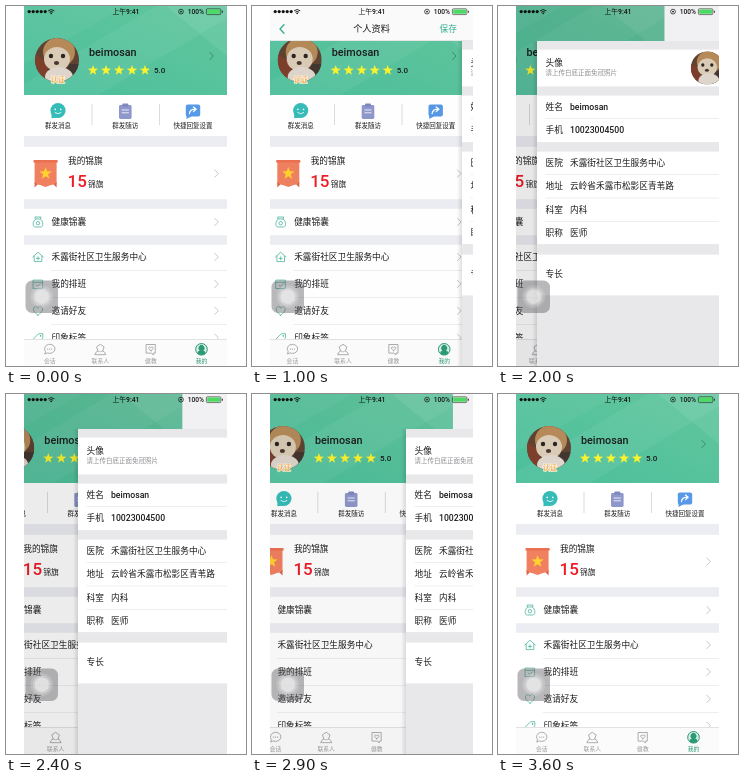
These frames come from a looping animation (240x360 px, 3700 ms). An HTML page:

```html
<!DOCTYPE html>
<html lang="zh-CN">
<head>
<meta charset="utf-8">
<title>个人资料</title>
<style>
html, body { margin: 0; width: 100%; height: 100%; overflow: hidden; background: #fff; }
svg { display: block; width: 240px; height: 360px; }
text { font-family: Roboto, "Noto Sans CJK SC", "Noto Sans CJK", sans-serif; font-weight: 500; }
</style>
</head>
<body>
<svg id="stage" viewBox="0 0 240 360"></svg>
<script>
const LEFT = 18, WIDTH = 203, LOOP = 3700, STEP = 100;
const GAP = '#ececf3', PAGE = '#e8e7ea', LINE = '#dcdce0', INK = '#1c1c1e';
const TEAL = '#2fae8e', MUTED = '#9a9a9e', PALE = '#4fb5a0', GREEN = '#2c9a76';
const USER = 'beimosan', PHONE = '10023004500';
const CLINIC = '禾露街社区卫生服务中心', ADDRESS = '云岭省禾露市松影区青苇路';

const rect = (x, y, w, h, fill, extra = '') =>
  `<rect x="${x}" y="${y}" width="${w}" height="${h}" fill="${fill}" ${extra}/>`;
const circle = (x, y, r, fill, extra = '') =>
  `<circle cx="${x}" cy="${y}" r="${r}" fill="${fill}" ${extra}/>`;
const ellipse = (x, y, rx, ry, fill) =>
  `<ellipse cx="${x}" cy="${y}" rx="${rx}" ry="${ry}" fill="${fill}"/>`;
const path = (d, fill, extra = '') => `<path d="${d}" fill="${fill}" ${extra}/>`;
const stroke = (d, color, width = 0.8) =>
  path(d, 'none', `stroke="${color}" stroke-width="${width}" stroke-linecap="round" stroke-linejoin="round"`);
const text = (x, y, size, str, fill = INK, anchor = 'start', extra = '') =>
  `<text x="${x}" y="${y}" font-size="${size}" fill="${fill}" text-anchor="${anchor}" ${extra}>${str}</text>`;
const group = (x, y, body, scale = 1) =>
  `<g transform="translate(${x} ${y}) scale(${scale})">${body}</g>`;
const chevron = (x, y, color = '#c0c0c5') => stroke(`M${x - 1.7} ${y - 3.6}l3.6 3.6l-3.6 3.6`, color, 0.9);
const band = (top, bottom) =>
  rect(LEFT, top, WIDTH, bottom - top, '#fff') +
  rect(LEFT, top, WIDTH, 0.4, LINE) + rect(LEFT, bottom - 0.4, WIDTH, 0.4, LINE);
const divider = (x, y) => rect(x, y, LEFT + WIDTH - x, 0.5, LINE);
const dots = (y, gap, r, fill) => [-gap, 0, gap].map(x => circle(x, y, r, fill)).join('');

function star(x, y, r, fill) {
  const pts = Array.from({ length: 10 }, (_, i) => {
    const a = -Math.PI / 2 + i * Math.PI / 5, d = i % 2 ? r * 0.4 : r;
    return `${(x + d * Math.cos(a)).toFixed(2)},${(y + d * Math.sin(a)).toFixed(2)}`;
  });
  return `<polygon points="${pts.join(' ')}" fill="${fill}"/>`;
}

// A soft picture of a small furry dog, radius 22 around the origin.
const avatar = (x, y, r) => group(x, y, `<g clip-path="url(#disc)">` +
  rect(-22, -22, 44, 44, '#5f4232') +
  path('M-22 -6L-10 2L-8 22H-22Z', '#7d3f2c') +
  path('M12 4H22V22H6Z', '#433630') +
  ellipse(2, -8, 16, 15, '#b58a58') +
  ellipse(0, -1, 13, 12, '#d9cbb6') +
  ellipse(2, 17, 14, 10, '#ded6cc') +
  circle(-6, -4, 2.2, '#2c241f') + circle(6, -4, 2.2, '#2c241f') +
  ellipse(-0.5, 3, 2.6, 2, '#463730') + '</g>', r / 22);

const icons = {
  chat: circle(0, -0.5, 7.6, '#36bcb8') + path('M-6.5 2L-6.5 7.2L0 6.5Z', '#36bcb8') +
    circle(-2.8, -1.6, 0.8, '#fff') + circle(2.8, -1.6, 0.8, '#fff') + stroke('M-3 1.6Q0 4.2 3 1.6', '#fff'),
  board: rect(-6.3, -6, 12.6, 14, '#8f98cb', 'rx="1.4"') + rect(-3, -7.6, 6, 3.4, '#8088c0', 'rx="1"') +
    stroke('M-3.2 -1H3.2M-3.2 1.8H3.2', '#fff'),
  reply: rect(-7.2, -6.5, 14.4, 12, '#5799e6', 'rx="2"') + path('M-6.5 4V8L-1 5Z', '#5799e6') +
    stroke('M-3.6 2.6Q-3 -1.6 2 -1.8M0.4 -4L3.2 -1.8L0.4 0.6', '#fff', 1.2),
  pouch: stroke('M-2.6 -2.8C-5.6 -0.6 -5.6 5 -2.8 5H2.8C5.6 5 5.6 -0.6 2.6 -2.8ZM-2.6 -2.8L-3 -5H3L2.6 -2.8', PALE) +
    circle(0, 1.2, 1.7, 'none', `stroke="${PALE}" stroke-width=".8"`),
  clinic: stroke('M-5.2 0L0 -4.8L5.2 0M-3.8 -1V4.6H3.8V-1M-1.6 1.4H1.6M0 -0.2V3', PALE),
  plan: stroke('M-4.6 -3.8H4.6V4.6H-4.6ZM-4.6 -1.6H4.6M-1.8 1.2L-0.3 2.6L2.2 0', PALE),
  heart: stroke('M0 4.4C-7 -0.2 -4.6 -4.6 -1.8 -4.2Q-0.4 -4 0 -2.6Q0.4 -4 1.8 -4.2C4.6 -4.6 7 -0.2 0 4.4Z', PALE),
  tag: stroke('M-5 1.6L0.6 -4H4.8V0.2L-0.8 5.8Z', PALE) + circle(2.6, -1.8, 0.8, PALE),
  talk: stroke('M-4.8 4.2L-4.2 2A5.2 4.6 0 1 1 -2 3.6Z', MUTED) + dots(-0.4, 2, 0.6, MUTED),
  people: stroke('M-5.4 4.8Q-5 2.4 -2.4 1.6L-3.8 -2.6L0 -5.2L3.8 -2.6L2.4 1.6Q5 2.4 5.4 4.8Z', MUTED) +
    stroke('M-2.4 1.6Q0 3.4 2.4 1.6', MUTED, 0.6),
  card: stroke('M-4.4 -5H4.4V3.6H2.4V5.4L0.4 3.6H-4.4Z', MUTED) +
    stroke('M0 1.2C-4 -1.2 -2 -3.6 0 -1.8C2 -3.6 4 -1.2 0 1.2Z', MUTED),
  me: circle(0, -0.2, 5.8, '#d7efe5', `stroke="${GREEN}" stroke-width="1"`) +
    path('M-4.2 4.2Q-4 1.6 -1.8 1A2.9 3.1 0 1 1 1.8 1Q4 1.6 4.2 4.2Q0 6.8 -4.2 4.2Z', GREEN),
};

function home() {
  const header = rect(LEFT, 0, WIDTH, 89, 'url(#green)') +
    path('M18 58L120 0H18Z', '#fff', 'opacity=".04"') +
    path('M92 89L221 12V0H150L18 78V89Z', '#fff', 'opacity=".05"') +
    path('M160 0H221V50Z', '#fff', 'opacity=".07"') +
    avatar(51, 54, 22) +
    text(51.8, 76.4, 7, '认证', '#f09a2e', 'middle', 'stroke="#fff3dc" stroke-width="1.4" paint-order="stroke"') +
    text(83, 50, 10.8, USER) +
    [0, 1, 2, 3, 4].map(i => star(87 + i * 13, 64.3, 5.4, '#fdf32c')).join('') +
    text(148, 67, 8, '5.0') + chevron(205.5, 50, '#33886a');

  const actions = rect(LEFT, 89, WIDTH, 41, '#fff') +
    [[52, 'chat', '群发消息'], [119.3, 'board', '群发随访'], [187, 'reply', '快捷回复设置']]
      .map(([x, icon, label]) => group(x, 105, icons[icon]) + text(x, 121.6, 6.5, label, INK, 'middle')).join('') +
    rect(85.7, 98, 0.6, 21, '#c4c4ca') + rect(153, 98, 0.6, 21, '#c4c4ca');

  const banner = band(140, 194) +
    path('M28.6 155H50.6V178Q45 178.6 39.6 181Q34 178.6 28.6 178Z', '#f0805f') +
    rect(27.4, 154, 24.4, 2.6, '#ea7050', 'rx="1.2"') +
    path('M28.6 176V181.5L31.6 178.4ZM50.6 176V181.5L47.6 178.4Z', '#dd6548') +
    star(39.6, 167.5, 6.6, '#ffd22e') +
    text(62, 158.4, 8.66, '我的锦旗') + text(61.5, 180.8, 17, '15', '#ee1c25') +
    text(82, 181.4, 7.8, '锦旗') + chevron(210.5, 167.5);

  const row = (y, icon, label) => group(32, y, icons[icon]) + text(45.5, y + 3.2, 8.66, label) + chevron(210.5, y);
  const list = band(202, 230) + row(216, 'pouch', '健康锦囊') + band(238, 346) +
    [['clinic', CLINIC], ['plan', '我的排班'], ['heart', '邀请好友'], ['tag', '印象标签']]
      .map(([icon, label], i) => row(251 + i * 26.9, icon, label) + (i ? divider(45, 237.6 + i * 26.9) : '')).join('');

  const tabs = rect(LEFT, 333, WIDTH, 28, '#fbfbfb') + rect(LEFT, 333, WIDTH, 0.5, '#c8c8cc') +
    [['talk', '会话'], ['people', '联系人'], ['card', '健教'], ['me', '我的']]
      .map(([icon, label], i) => group(43.7 + i * 50.6, 343.5, icons[icon]) +
        text(43.7 + i * 50.6, 357.2, 5.8, label, i === 3 ? GREEN : MUTED, 'middle')).join('');

  return rect(LEFT, 0, WIDTH, 360, GAP) + header + actions + banner + list + tabs;
}

function profile() {
  const field = (y, label, value, more) =>
    text(26.5, y + 3.2, 8.66, label) + text(51, y + 3.2, 8.66, value) + (more ? chevron(210, y) : '');
  return rect(LEFT - 5, 35, 5, 325, 'url(#shade)') + rect(LEFT, 35, WIDTH, 325, PAGE) +
    band(43, 81) + text(26.5, 60.3, 8.66, '头像') +
    text(26.5, 69.4, 6.5, '请上传白底正面免冠照片', '#8c8c90') + avatar(188.3, 62, 16.5) + chevron(210, 62) +
    band(89, 136.5) + field(100.5, '姓名', USER) + divider(26.5, 112.3) + field(124, '手机', PHONE) +
    band(145, 238.5) +
    [['医院', CLINIC], ['地址', ADDRESS], ['科室', '内科'], ['职称', '医师']]
      .map(([label, value], i) => field(156.3 + i * 23.6, label, value, true) +
        (i ? divider(26.5, 144.5 + i * 23.6) : '')).join('') +
    band(248, 290) + text(26.5, 271.4, 8.66, '专长');
}

const navBar = rect(LEFT, 0, WIDTH, 35, '#fafafa') + rect(LEFT, 34.6, WIDTH, 0.4, '#c8c8cc') +
  stroke('M32 18.8L28 23L32 27.2', TEAL, 1.3) +
  text(119.5, 26.3, 9.2, '个人资料', INK, 'middle') + text(187.5, 26.2, 8.66, '保存', TEAL);

const statusBar = [0, 1, 2, 3, 4].map(i => circle(23.2 + i * 4, 5.6, 1.6, '#111')).join('') +
  stroke('M42.4 4.6Q45.2 2.2 48 4.6M43.6 6Q45.2 4.6 46.8 6', '#111', 0.9) + circle(45.2, 7.4, 0.8, '#111') +
  text(120, 8.2, 6.8, '上午9:41', '#111', 'middle') +
  circle(175, 5.6, 2.4, 'none', 'stroke="#111" stroke-width=".7"') + circle(175, 5.6, 0.9, '#111') +
  text(181.8, 8, 6.6, '100%', '#111') +
  rect(200.4, 2.8, 14.4, 5.8, 'none', 'rx="1" stroke="#222" stroke-width=".6"') +
  rect(201.2, 3.6, 12.8, 4.2, '#4cd964', 'rx=".4"') + rect(215.8, 4.7, 1, 2, '#222');

const touchDot = rect(19.5, 274.5, 32.5, 32.5, '#5c5c60', 'rx="6.5" opacity=".43"') +
  circle(35.8, 290.7, 11.5, '#fff', 'opacity=".16"') + circle(35.8, 290.7, 9.3, '#fff', 'opacity=".24"') +
  circle(35.8, 290.7, 7.2, '#fff', 'opacity=".4"');

document.getElementById('stage').innerHTML = `
  <defs>
    <clipPath id="phone"><rect x="${LEFT}" y="0" width="${WIDTH}" height="360"/></clipPath>
    <clipPath id="disc"><circle r="22"/></clipPath>
    <linearGradient id="green" x1="0" y1="1" x2="1" y2="0">
      <stop offset="0" stop-color="#4bbf9b"/><stop offset="1" stop-color="#62c69e"/>
    </linearGradient>
    <linearGradient id="shade">
      <stop offset="0" stop-color="#000" stop-opacity="0"/><stop offset="1" stop-color="#000" stop-opacity=".12"/>
    </linearGradient>
  </defs>
  <g clip-path="url(#phone)">
    ${rect(LEFT, 0, WIDTH, 360, '#f1f1f3')}
    <g id="home">${home()}<rect id="dim" x="${LEFT}" y="0" width="${WIDTH}" height="360"/></g>
    <g id="profile">${profile()}</g>
    <g id="nav">${navBar}</g>
    ${statusBar}${touchDot}
  </g>`;

// Distance of the profile page from its resting place: [time, offset].
const slide = [
  [0, 203], [900, 203], [1000, 192], [1100, 105], [1200, 42], [1300, 9], [1400, 0], [1500, 0],
  [1600, 2], [1800, 10], [2000, 21], [2400, 54], [2900, 136], [3100, 176], [3200, 194], [3300, 203], [3700, 203],
];

function offsetAt(t) {
  const i = slide.findIndex(([time]) => time > t);
  const [t0, a] = slide[i - 1], [t1, b] = slide[i];
  return a + (b - a) * (t - t0) / (t1 - t0);
}

const [homeEl, profileEl, navEl, dimEl] = ['home', 'profile', 'nav', 'dim'].map(id => document.getElementById(id));

function draw(now) {
  const t = Math.floor((now % LOOP) / STEP) * STEP;
  const offset = offsetAt(t), hidden = WIDTH - offset;
  homeEl.setAttribute('transform', `translate(${-0.3 * hidden} 0)`);
  profileEl.setAttribute('transform', `translate(${offset} 0)`);
  profileEl.setAttribute('visibility', hidden > 0 ? 'visible' : 'hidden');
  navEl.setAttribute('visibility', t >= 900 && t < 1600 ? 'visible' : 'hidden');
  dimEl.setAttribute('opacity', 0.1 * hidden / WIDTH);
}

const start = performance.now();
function tick() {
  draw(Math.max(0, performance.now() - start));
  requestAnimationFrame(tick);
}
tick();
</script>
</body>
</html>
```
